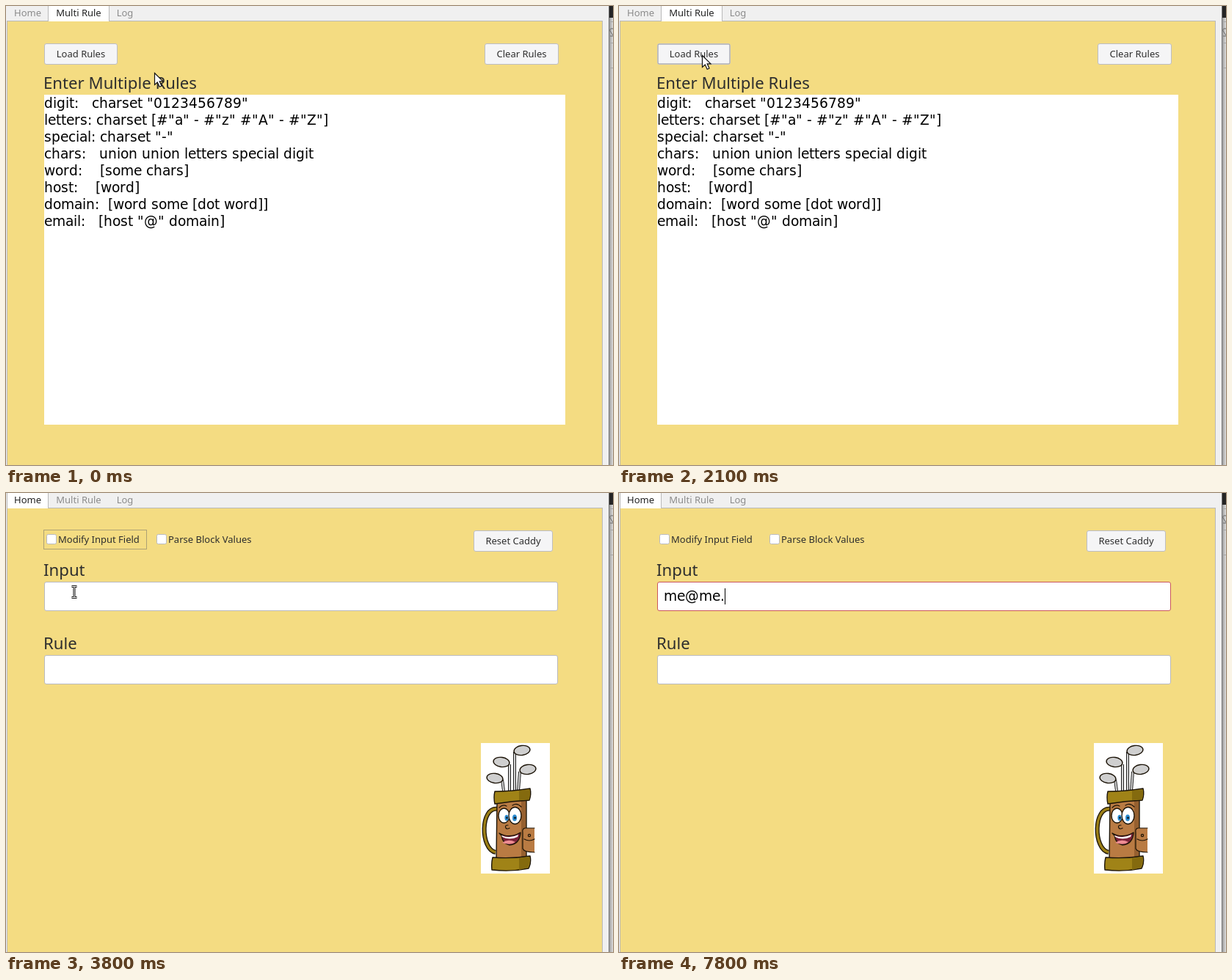
Recreate the animation shown at these times as an HTML page. Size 827 by 626 pixels, loop 8 s.

```html
<!DOCTYPE html>
<html lang="en">
<head>
<meta charset="utf-8">
<title>Rules</title>
<style>
  html, body { margin: 0; width: 100%; height: 100%; overflow: hidden; background: #f0f0f0; }
  svg { display: block; width: 827px; height: 626px; }
  text { font: 13px "Noto Sans", "Open Sans", sans-serif; fill: #2e2e2e; }
  .head { font-size: 22.2px; }
  .code { font: 18.67px "DejaVu Sans", sans-serif; fill: #000; white-space: pre; }
  .mid { text-anchor: middle; }
  .tab { fill: #8b8b8b; }
  .btn { fill: #f5f5f6; stroke: #bdbdc2; }
  .field { fill: #fff; stroke: #b9bac0; }
  .dots { fill: none; stroke: #666; stroke-dasharray: 1 1; }
  .ink { stroke: #1c1408; stroke-width: 1.4; stroke-linejoin: round; }
  .line { fill: none; stroke: #1c1408; stroke-width: 1.2; stroke-linecap: round; }
</style>
</head>
<body>
<svg viewBox="0 0 827 626">
  <defs>
    <linearGradient id="shade">
      <stop offset="0" stop-color="#8c8c8c"/>
      <stop offset="1" stop-color="#dedede"/>
    </linearGradient>
  </defs>

  <!-- window -->
  <rect width="827" height="626" fill="#f0f0f0"/>
  <rect x="821" width="6" height="626" fill="url(#shade)"/>
  <rect x="822" width="5" height="16" fill="#242424"/>
  <path d="M822 21.500h5M822 50.500h5M822 84.500h5" stroke="#a5a5a5"/>
  <path d="M827 31q-5-1-4 3l4 6M823 41h4" fill="none" stroke="#666"/>
  <path d="M821.500 0V626" stroke="#777"/>
  <rect x="1.500" y="20.500" width="811" height="620" fill="#f4dc82" stroke="#b9b9b9"/>

  <!-- tabs -->
  <g id="tabMulti"><rect x="58" width="82" height="21" fill="#fff"/><path d="M57.500 0V20M140.500 0V20" stroke="#b9b9b9"/></g>
  <g id="tabHome"><rect x="2" width="55" height="21" fill="#fff"/><path d="M1.500 0V20M57.500 0V20" stroke="#b9b9b9"/></g>
  <text class="tab" id="nameHome" x="29.500" y="14" text-anchor="middle">Home</text>
  <text class="tab mid" id="nameMulti" x="99" y="14">Multi Rule</text>
  <text class="tab mid" x="162" y="14">Log</text>

  <g id="multi">
    <rect class="btn" x="52.500" y="51.500" width="99" height="28" rx="2.500"/>
    <rect id="press" x="52.500" y="51.500" width="99" height="28" rx="2.500" fill="#c25858" stroke="#b04c4e"/>
    <rect class="dots" id="loadFocus" x="53.500" y="52.500" width="97" height="26"/>
    <text class="mid" id="load" x="102" y="70">Load Rules</text>
    <rect class="btn" x="652.500" y="51.500" width="100" height="28" rx="2.500"/>
    <text class="mid" x="702.500" y="70">Clear Rules</text>
    <text class="head" x="51" y="113">Enter Multiple Rules</text>
    <rect x="52" y="121" width="710" height="450" fill="#fff"/>
    <g id="rules"></g>
  </g>

  <g id="home">
    <rect class="dots" id="checkFocus" x="51.500" y="50.500" width="140" height="26"/>
    <rect class="field" x="55.500" y="56.500" width="13" height="13" rx="2"/>
    <text x="71" y="68">Modify Input Field</text>
    <rect class="field" x="205.500" y="56.500" width="13" height="13" rx="2"/>
    <text x="221" y="68">Parse Block Values</text>
    <rect class="btn" x="637.500" y="51.500" width="107" height="28" rx="2.500"/>
    <text class="mid" x="691" y="70">Reset Caddy</text>
    <text class="head" x="51" y="113">Input</text>
    <rect class="field" id="input" x="52.500" y="121.500" width="699" height="39" rx="2.500"/>
    <text class="code" id="typed" y="147"></text>
    <rect id="caret" y="130" width="1" height="22"/>
    <text class="head" x="51" y="213">Rule</text>
    <rect class="field" x="52.500" y="221.500" width="699" height="39" rx="2.500"/>

    <!-- golf bag -->
    <rect x="647" y="341" width="94" height="178" fill="#fff"/>
    <g id="clubs"></g>
    <path d="M670 431C646 427 646 486 667 490" fill="none" stroke="#1c1408" stroke-width="6"/>
    <path d="M670 431C646 427 646 486 667 490" fill="none" stroke="#9c7f16" stroke-width="3.400"/>
    <path class="ink" d="M669 419H709V498H668Z" fill="#b97b43"/>
    <path d="M702 420H708V496H702Z" fill="#96602f"/>
    <path class="ink" d="M666 407Q689 407 714 403Q716 411 713 419Q690 420 666 424Q664 415 666 407Z" fill="#a08317"/>
    <path d="M699 406L713 404Q715 411 712 418L699 419Z" fill="#846a0e"/>
    <path class="ink" d="M663 497Q690 499 714 495Q716 504 712 512Q688 517 662 514Q661 505 663 497Z" fill="#a08317"/>
    <path d="M699 498L713 496Q714 504 711 511L699 514Z" fill="#846a0e"/>
    <path d="M720 457H707Q703 458 704 463V485Q706 490 720 490Z" fill="#b97b43"/>
    <path class="line" d="M720 457H707Q703 458 704 463V485Q706 490 720 490M706 472Q713 476 720 472"/>
    <circle class="line" cx="713" cy="467" r="1.600"/>
    <ellipse class="ink" cx="678.500" cy="440" rx="7.500" ry="10" fill="#fff"/>
    <ellipse class="ink" cx="693.500" cy="440" rx="8.500" ry="11.500" fill="#fff"/>
    <g fill="#2a8bd0"><ellipse cx="682" cy="443" rx="2.600" ry="4"/><ellipse cx="693" cy="443" rx="3" ry="4.500"/></g>
    <g fill="#10202c"><circle cx="682.500" cy="443" r="1.400"/><circle cx="693.500" cy="443" r="1.600"/></g>
    <path class="line" d="M672 429Q677 424 682 427M690 426Q696 422 702 428M684 453Q679 453 681 457Q683 459 686 457" />
    <path class="ink" d="M672 464Q686 472 701 463Q700 479 686 480Q677 479 675 467Z" fill="#7c2239"/>
    <path d="M676 477Q684 471 694 476Q688 481 676 477Z" fill="#ee8d93"/>
    <path d="M675 467Q686 472 698 466L697 469Q686 474 676 469Z" fill="#fff"/>
  </g>

  <path id="arrow" d="M.500 .500V16.500L4.300 13L7.200 19.300L10 18L7.200 11.800H12Z" fill="#fff" stroke="#111" stroke-width="1.200"/>
  <g id="beam" fill="none">
    <path d="M-3.500 -7.500H3.500M0 -7.500V7.500M-3.500 7.500H3.500" stroke="#111" stroke-width="3"/>
    <path d="M-3.500 -7.500H3.500M0 -7.500V7.500M-3.500 7.500H3.500" stroke="#fff"/>
  </g>
</svg>
<script>
const $ = id => document.getElementById(id);
const make = (parent, tag, attrs) => {
  const el = document.createElementNS('http://www.w3.org/2000/svg', tag);
  for (const k in attrs) el.setAttribute(k, attrs[k]);
  return parent.appendChild(el);
};
const show = (id, on) => $(id).setAttribute('visibility', on ? 'visible' : 'hidden');

// Whole-pixel advances, like a hinted toolkit font
const pen = document.createElement('canvas').getContext('2d');
pen.font = '18.67px "DejaVu Sans", sans-serif';
const advances = (str, x) => [...str].reduce(
  (xs, c) => [...xs, xs[xs.length - 1] + Math.round(pen.measureText(c).width)], [x]);
const setCode = (el, str, x) => {
  const xs = advances(str, x);
  el.textContent = str;
  el.setAttribute('x', xs.join(' '));
  return xs[xs.length - 1];
};

[
  'digit:   charset "0123456789"',
  'letters: charset [#"a" - #"z" #"A" - #"Z"]',
  'special: charset "-"',
  'chars:   union union letters special digit',
  'word:    [some chars]',
  'host:    [word]',
  'domain:  [word some [dot word]]',
  'email:   [host "@" domain]'
].forEach((s, i) => setCode(make($('rules'), 'text', { class: 'code', y: 139 + 23 * i }), s, 52));

// shaft top, shaft foot, head centre
[
  [693, 353, 693, 703, 351], [686, 370, 686, 675, 367],
  [700, 380, 698, 711, 377], [676, 391, 678, 666, 389]
].forEach(([x, y, foot, cx, cy]) => {
  const d = `M${x} ${y}L${foot} 406`;
  make($('clubs'), 'path', { d, stroke: '#222', 'stroke-width': 4 });
  make($('clubs'), 'path', { d, stroke: '#d4d4d4', 'stroke-width': 2 });
  make($('clubs'), 'ellipse', { class: 'ink', cx, cy, rx: 11, ry: 6.5, fill: '#cfcfcf',
    transform: `rotate(${cx < x ? 8 : -8} ${cx} ${cy})` });
});

// time, x, y of the pointer, held until the next entry
const moves = [
  [0, 202, 91], [600, 208, 93], [700, 198, 91], [800, 178, 86], [900, 155, 80],
  [1000, 134, 74], [1100, 118, 70], [1200, 110, 69], [1300, 107, 69],
  [2100, 113, 67], [2200, 108, 59], [2300, 90, 47], [2400, 72, 38], [2800, 17, 7],
  [3300, 20, 14], [3400, 33, 38], [3500, 51, 70], [3600, 69, 100],
  [3700, 84, 124], [3800, 93, 135], [3900, 97, 139]
];
const keys = [4900, 5100, 6000, 6500, 7000, 7800];
const OPEN = 3100, CLICK = 4000, PRESS = 1600;

function draw(t) {
  const home = t >= OPEN, focused = t >= CLICK;
  show('home', home);
  show('tabHome', home);
  show('multi', !home);
  show('tabMulti', !home);
  $('nameHome').style.fill = home ? '#222' : t >= 2800 ? '#5c5c5c' : '';
  $('nameMulti').style.fill = home ? '' : '#222';

  const fade = t < PRESS ? 0 : Math.max(0, 1 - Math.floor((t - PRESS) / 100) / 3);
  $('press').setAttribute('opacity', fade);
  $('load').style.fill = fade > 0.5 ? '#fff' : '';
  $('loadFocus').style.stroke = fade > 0.5 ? '#e9b9b9' : '#8a8a8a';
  show('loadFocus', !home && t >= PRESS);

  show('checkFocus', home && !focused);
  $('input').style.stroke = focused ? '#c9565c' : '';
  const count = keys.filter(k => t >= k).length;
  $('caret').setAttribute('x', setCode($('typed'), 'me@me.'.slice(0, count), 61));
  show('caret', focused && (t < 4600 || count > 0));

  const [, x, y] = moves.filter(m => t >= m[0]).pop();
  const inField = home && y > 121;
  for (const id of ['arrow', 'beam']) $(id).setAttribute('transform', `translate(${x} ${y})`);
  show('arrow', !inField);
  show('beam', inField && count === 0);
}

const start = performance.now();
(function tick() {
  draw((performance.now() - start) % 8000);
  requestAnimationFrame(tick);
})();
</script>
</body>
</html>
```
